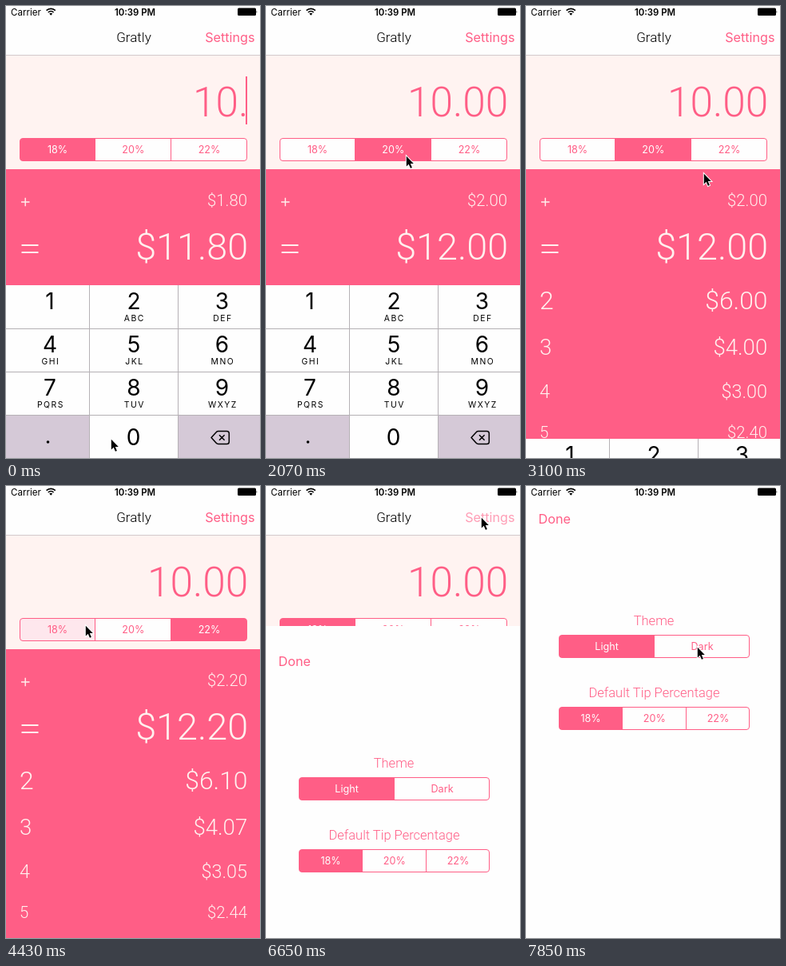
These frames come from a looping animation (318x565 px, 8 s). An HTML page:

```html
<!DOCTYPE html>
<html lang="en">
<head>
<meta charset="utf-8">
<title>Tip calculator</title>
<style>
  html, body { margin: 0; width: 100%; height: 100%; overflow: hidden; background: #fefefe; }
  svg { display: block; width: 318px; height: 565px; }
  text { font-family: Inter, "Open Sans", sans-serif; white-space: pre; }
  .thin { font-family: Roboto, "Liberation Sans", sans-serif; font-weight: 300; }
  .pink { fill: #ff5e86; }
  .pale { fill: #fff0ee; }
  .mid { text-anchor: middle; }
  .end { text-anchor: end; }
  .sub { letter-spacing: 1.5px; }
  .bold { font-weight: 600; }
</style>
</head>
<body>
<svg id="stage" viewBox="0 0 318 565">
  <g id="home">
    <rect width="318" height="565" fill="#fefefe"/>
    <rect y="61" width="318" height="144" fill="#fff3f1"/>
    <rect y="61" width="318" height="1" fill="#d3cacc"/>
    <rect y="204" width="318" height="361" class="pink"/>
    <rect id="caret" x="300" y="88" width="2" height="60" class="pink"/>
    <g stroke="#fff0ee" fill="none">
      <path d="M19 245h10.5M24.2 239.8v10.5" stroke-width="1.4"/>
      <path d="M19.5 299h21M19.5 308h21" stroke-width="2"/>
    </g>
  </g>
  <g id="keys"></g>
  <g id="sheet"><rect y="-3" width="318" height="570" fill="#fefefe"/></g>
  <g id="status">
    <g fill="none" stroke="#000" stroke-width="1.7">
      <path d="M50.6 5.6a8 8 0 0 1 11.2 0M52.8 8a5 5 0 0 1 6.8 0"/>
    </g>
    <path d="M56.2 11.8l-2-2.2a3 3 0 0 1 4 0z"/>
    <rect x="290" y="2.5" width="23" height="9.5" rx="1.5"/>
    <path d="M313.6 5.4q1.6 1.8 0 3.6z"/>
  </g>
  <path id="pointer" d="M.8.8v12.6l2.9-2.7 2.2 5.1 2-.9-2.1-4.8h4z" fill="#000" stroke="#fff" stroke-width="2" paint-order="stroke"/>
</svg>
<script>
const LOOP = 8000, TICK = 148, LAST = 53;   // the screen refreshes once per tick
const PINK = '#ff5e86', PRESSED = '#fee7ed', GREY = '#d5c9d7', WHITE = '#fefefe';
const $ = id => document.getElementById(id);

function add(parent, tag, attrs, content = '') {
  const el = document.createElementNS('http://www.w3.org/2000/svg', tag);
  for (const k in attrs) el.setAttribute(k, attrs[k]);
  el.textContent = content;
  return parent.appendChild(el);
}
const label = (parent, x, y, size, cls, content) =>
  add(parent, 'text', { x, y, 'font-size': size, class: cls }, content);

// Segmented control; edges lists the left side, the dividers and the right side.
function segments(parent, y, edges, names) {
  const left = edges[0], width = edges[edges.length - 1] - left;
  const box = { x: left + .5, y: y + .5, width: width - 1, height: 28, rx: 3.5 };
  const id = 'clip' + y;
  add(add(parent, 'clipPath', { id }), 'rect', box);
  const fills = add(parent, 'g', { 'clip-path': `url(#${id})` });
  const cells = names.map((name, i) => {
    const x = edges[i], w = edges[i + 1] - x;
    const rect = add(fills, 'rect', { x, y, width: w, height: 29 });
    if (i) add(fills, 'rect', { x: x - .5, y, width: 1, height: 29, fill: PINK });
    return { rect, text: label(parent, x + w / 2 + .3, y + 19.1, 12.6, 'mid', name) };
  });
  add(parent, 'rect', { ...box, fill: 'none', stroke: PINK });
  return (chosen, pressed = -1) => cells.forEach(({ rect, text }, i) => {
    rect.setAttribute('fill', i === chosen ? PINK : i === pressed ? PRESSED : WHITE);
    text.setAttribute('fill', i === chosen ? WHITE : PINK);
  });
}

const amount = (y, size, cls) => label($('home'), 301 + size * .045, y, size, 'thin end ' + cls, '');

const RATES = [18, 20, 22];
const rateNames = RATES.map(r => r + '%');

// Home screen
label($('home'), 160, 45, 17, 'thin mid', 'Gratly');
const settings = label($('home'), 311.5, 45, 16.2, 'pink end', 'Settings');
const bill = amount(138, 51.4, 'pink');
const tip = amount(250, 20.3, 'pale');
const total = amount(317, 46.8, 'pale');
const shares = [[2, 379, 31.8], [3, 436, 27.6], [4, 489.5, 23.4], [5, 540, 20.3]].map(([n, y, size]) => {
  label($('home'), 17, y, size, 'thin pale', n);
  return { n, text: amount(y, size, 'pale') };
});
const showRate = segments($('home'), 165, [17, 111.5, 206.5, 302], rateNames);

// Keypad
const COLS = [[0, 104, 55], [105, 110, 160], [216, 102, 270.5]];
const SUBS = ['', 'ABC', 'DEF', 'GHI', 'JKL', 'MNO', 'PQRS', 'TUV', 'WXYZ'];
const keys = $('keys');
add(keys, 'rect', { y: 349, width: 318, height: 217, fill: '#b5b1b5' });
let zeroKey;
for (let i = 0; i < 12; i++) {
  const [x, width, cx] = COLS[i % 3], row = Math.floor(i / 3), y = 349 + 54 * row + (row ? 1 : 0);
  const face = add(keys, 'rect', { x, y, width, height: row ? 53 : 54, fill: i === 9 || i === 11 ? GREY : WHITE });
  if (i < 9) {
    label(keys, cx, 379 + 54 * row, 28, 'mid', i + 1);
    label(keys, cx + .9, 394 + 54 * row, 10.4, 'mid sub', SUBS[i]);
  } else if (i === 10) {
    zeroKey = face;
    label(keys, 159.5, 548.5, 28, 'mid', '0');
  }
}
add(keys, 'circle', { cx: 52.5, cy: 545, r: 1.8 });
add(keys, 'path', {
  d: 'M257 539.5l6.2-6.8q1-1.2 2.6-1.2h10.7q2.8 0 2.8 2.8v10.4q0 2.8-2.8 2.8h-10.7q-1.6 0-2.6-1.2zM267 536.2l6.6 6.6m0-6.6l-6.6 6.6',
  fill: 'none', stroke: '#000', 'stroke-width': 1.5, 'stroke-linejoin': 'round'
});

// Settings sheet
const sheet = $('sheet');
label(sheet, 15.5, 47, 16.2, 'pink', 'Done');
label(sheet, 160, 174, 16.5, 'thin pink mid', 'Theme');
label(sheet, 160.5, 264, 16.5, 'thin pink mid', 'Default Tip Percentage');
segments(sheet, 186, [41, 160.5, 280], ['Light', 'Dark'])(0);
segments(sheet, 276, [41, 120.5, 200.5, 280], rateNames)(0);

// Status bar
label($('status'), 6, 11.8, 11.6, '', 'Carrier');
label($('status'), 161.5, 11.8, 11.4, 'mid bold', '10:39 PM');

// Tables of [tick, value...]
const PATH = [
  [0, 131, 541], [5, 131, 541], [7, 150, 250], [8, 150, 250], [10, 168, 192], [12, 175, 187],
  [17, 176, 187], [19, 222, 209], [23, 222, 209], [25, 236, 178], [27, 236, 178], [30, 99, 174],
  [33, 99, 174], [36, 242, 171], [37, 242, 171], [39, 261, 46], [40, 261, 46], [42, 269, 39],
  [46, 269, 39], [50, 211, 163], [53, 214, 201]
];
const BILL = [[0, '10.'], [1, '10.0'], [4, '10.00']];
const ZERO = [[0, false], [1, true], [3, false], [4, true], [5, false]];
const CARET = [[0, true], [7, false], [10, true], [13, false], [16, true], [18, false]];
const CHOSEN = [[0, 0], [12, 1], [26, 2], [31, 0]];
const HELD = [[0, -1], [11, 1], [12, -1], [25, 2], [26, -1], [30, 0], [31, -1]];

const at = (table, k) => table.filter(row => row[0] <= k).pop()[1];

function along(path, k) {
  const i = Math.max(1, path.findIndex(p => p[0] >= k));
  const [k0, x0, y0] = path[i - 1], [k1, x1, y1] = path[i];
  const f = (k - k0) / (k1 - k0);
  return [x0 + (x1 - x0) * f, y0 + (y1 - y0) * f];
}

function easeOut(k, start, length, power) {
  const p = Math.min(1, Math.max(0, (k - start) / length));
  return 1 - (1 - p) ** power;
}

const money = v => '$' + v.toFixed(2);
const move = (el, x, y) => el.setAttribute('transform', `translate(${Math.round(x)} ${Math.round(y)})`);

function draw(k) {
  const chosen = at(CHOSEN, k), extra = RATES[chosen] / 10, sum = 10 + extra;
  bill.textContent = at(BILL, k);
  tip.textContent = money(extra);
  total.textContent = money(sum);
  shares.forEach(({ n, text }) => { text.textContent = money(sum / n); });
  showRate(chosen, at(HELD, k));
  $('caret').setAttribute('opacity', at(CARET, k) ? 1 : 0);
  zeroKey.setAttribute('fill', at(ZERO, k) ? GREY : WHITE);
  settings.setAttribute('opacity', k >= 44 ? .6 : 1);
  move(keys, 0, 216 * easeOut(k, 19.6, 2.4, 2.5));
  move(sheet, 0, 570 - 570 * easeOut(k, 44, 3.4, 3.34));
  move($('pointer'), ...along(PATH, k));
}

let shown = -1;
function frame(now) {
  const k = Math.min(LAST, Math.floor((now % LOOP + 14) / TICK));
  if (k !== shown) draw(shown = k);
  requestAnimationFrame(frame);
}
draw(0);
requestAnimationFrame(frame);
</script>
</body>
</html>
```
